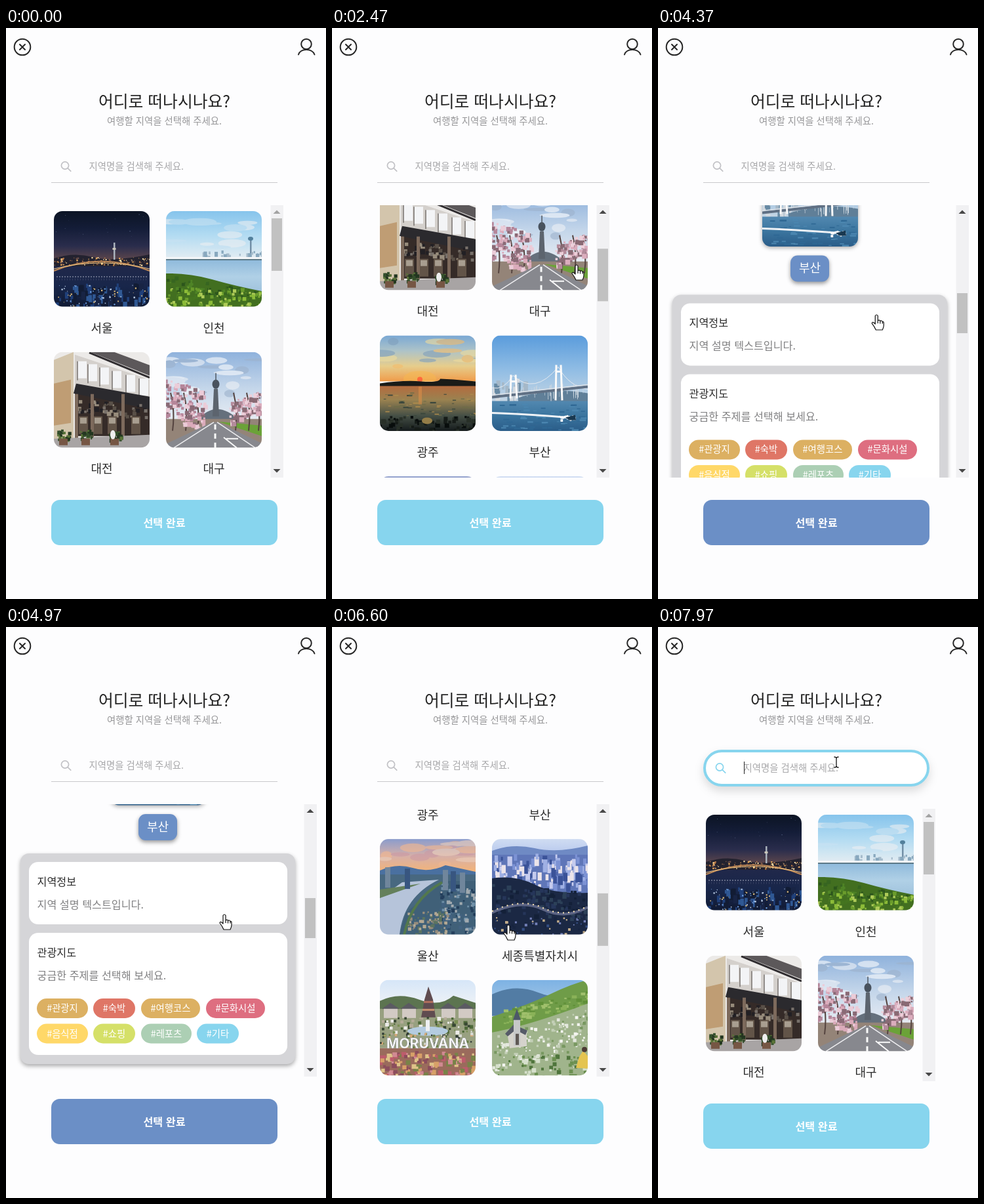
An HTML page that plays this animation: 488 px wide and 870 px high, repeating every 8 s.

```html
<!DOCTYPE html>
<html lang="ko">
<head>
<meta charset="utf-8">
<title>지역 선택</title>
<style>
html, body { margin: 0; width: 100%; height: 100%; overflow: hidden; background: #fdfdfe; }
svg { display: block; width: 488px; height: 870px; }
text { font: 400 14.4px "Noto Sans CJK KR", "Noto Sans CJK", sans-serif; fill: #2b2b2b; white-space: pre; }
.mid { text-anchor: middle; }
.name { font-size: 18px; }
.info { font-size: 16.2px; }
.tag { fill: #fff; font-weight: 500; }
.line { fill: none; stroke: #262626; stroke-width: 2; stroke-linecap: round; }
.pointer { fill: #fff; stroke: #111; stroke-width: 1.2; stroke-linejoin: round; }
.photo { filter: blur(.6px); }
</style>
</head>
<body>
<svg viewBox="0 0 488 870">
  <defs>
    <clipPath id="view"><rect y="270" width="488" height="415"/></clipPath>
    <clipPath id="frame"><rect width="146" height="145.5" rx="13"/></clipPath>
  </defs>
  <rect width="488" height="870" fill="#fdfdfe"/>
  <g class="line">
    <circle cx="25" cy="29" r="12.3"/>
    <path d="M21 25l8 8M29 25l-8 8"/>
    <circle cx="458" cy="24.5" r="7.8"/>
    <path d="M446 40.5C449 30.5 467 30.5 470.5 40.5"/>
  </g>
  <text class="mid" x="241.5" y="121" style="font-size:24.8px;font-weight:500;fill:#222">어디로 떠나시나요?</text>
  <text class="mid" x="241.5" y="146.7" style="fill:#969698">여행할 지역을 선택해 주세요.</text>

  <path id="underline" d="M69 235.5H414" stroke="#c9c9cc"/>
  <rect id="box" x="71" y="189" width="341" height="52" rx="26" fill="#fff" stroke="#87d5ee" stroke-width="4"
        style="filter:drop-shadow(0 7px 7px #0002)"/>
  <g id="query">
    <g id="lens" fill="none" stroke-width="1.7" stroke-linecap="round">
      <circle cx="90" cy="209.5" r="5.6"/><path d="M94.2 213.7l4.5 4.5"/>
    </g>
    <text x="126.5" y="215.8" style="fill:#a8a8aa">지역명을 검색해 주세요.</text>
    <path id="caret" d="M127.5 201v19" stroke="#222"/>
  </g>

  <g id="lower">
    <g clip-path="url(#view)"><g id="list"></g></g>
    <g id="bar">
      <rect x="403.5" y="270" width="19.5" height="415" fill="#f1f1f3"/>
      <rect id="thumb" x="405" width="16" fill="#c1c1c1"/>
      <path id="up" d="M407.5 283l5.5-5.5 5.5 5.5z"/>
      <path d="M407.5 672l5.5 5.5 5.5-5.5z" fill="#484848"/>
    </g>
    <rect id="button" x="69" y="719" width="345" height="69" rx="13"/>
    <text class="mid" x="241.5" y="759.5" style="font-size:16.2px;font-weight:700;fill:#fff">선택 완료</text>
  </g>

  <g id="cursor">
    <path id="hand" class="pointer" d="M-2 1.5Q0-1.5 2 1.5V9Q4.5 7 5.5 9.5Q8 8 9 10.5Q11 10 11 12.5V16Q11 19 9 23H-1Q-3 18-7 13Q-7 10.5-4 12L-2 14ZM2 9v4M5.5 9.5v4M9 10.5v3"/>
    <path id="arrow" class="pointer" d="M0 0V16L4 12.5 6.5 18.5 9 17.4 6.5 11.5H12Z"/>
    <path id="beam" d="M-3.5-8Q0-8 0-6V6Q0 8-3.5 8M3.5-8Q0-8 0-6M0 6Q0 8 3.5 8" fill="none" stroke="#111" stroke-width="1.3"/>
  </g>
</svg>
<script>
const $ = id => document.getElementById(id);

// Small drawing kit for the 146 px pictures
let seed = 1, gradients = 0;
const random = () => (seed = seed * 16807 % 2147483647) / 2147483647;
const rect = (x, y, w, h, fill) => `<rect x="${x}" y="${y}" width="${w}" height="${h}" fill="${fill}"/>`;
const shape = (d, fill) => `<path d="${d}" fill="${fill}"/>`;
const stroke = (d, color, width = 1, extra = '') =>
  `<path d="${d}" fill="none" stroke="${color}" stroke-width="${width}" ${extra}/>`;
const oval = (x, y, rx, ry, fill) => `<ellipse cx="${x}" cy="${y}" rx="${rx}" ry="${ry}" fill="${fill}"/>`;
const fade = (y, h, ...colors) => {
  const id = 'fade' + gradients++;
  const stops = colors.map((c, i) => `<stop offset="${i / (colors.length - 1)}" stop-color="${c}"/>`).join('');
  return `<linearGradient id="${id}" x2="0" y2="1">${stops}</linearGradient>` + rect(0, y, 146, h, `url(#${id})`);
};
// Scattered specks; slope lowers the band towards its right end
const specks = (n, x, y, w, h, size, colors, slope = 0, tall = 1) => {
  let out = '';
  for (let i = 0; i < n; i++) {
    const u = random(), s = size * (.5 + random());
    out += rect((x + u * w).toFixed(1), (y + random() * h + u * slope).toFixed(1), s.toFixed(1),
      (s * tall).toFixed(1), colors[i % colors.length]);
  }
  return out;
};
const clouds = (n, y, h, colors) => {
  let out = '';
  for (let i = 0; i < n; i++)
    out += oval(random() * 146, y + random() * h, 8 + random() * 18, 2 + random() * 5, colors[i % colors.length]);
  return `<g opacity=".6">${out}</g>`;
};

const pictures = {
  서울: () => fade(0, 80, '#0c1424', '#141d38', '#2a2d4c', '#6a4d4c')
    + specks(14, 0, 4, 146, 40, .8, ['#5f6f92'])
    + shape('M0 72Q30 62 60 70T146 66V90H0Z', '#23222f')
    + rect(91, 48, 2.5, 26, '#a9b2bc') + rect(89.5, 56, 5, 3, '#c8c4b8')
    + specks(130, 0, 70, 146, 12, 1.6, ['#f2b15c', '#b87a48', '#ffe2a8', '#6c4f4a'])
    + fade(84, 62, '#20284a', '#18264a', '#101a34')
    + stroke('M0 91Q72 62 146 91', '#c08a58', 2) + stroke('M0 88Q72 70 146 88', '#f4c884', 1)
    + stroke('M4 100H142', '#a8adc0', 1, 'stroke-dasharray="2 2"')
    + stroke('M4 104H142', '#343e60', 3, 'stroke-dasharray="1 3"')
    + specks(90, 0, 110, 146, 34, 4.5, ['#20407a', '#121c34', '#2f5894', '#182444'], 0, 2)
    + specks(75, 0, 112, 146, 32, 1.6, ['#6f9fe0', '#c3d6ee', '#d3b478']),
  인천: () => fade(0, 76, '#86c4ec', '#b4dcf2', '#e8eef2')
    + clouds(12, 14, 45, ['#eceff2', '#c8e2f2'])
    + rect(128, 44, 2.5, 28, '#728fa6') + oval(129, 42, 4, 3, '#52809c')
    + specks(22, 55, 60, 90, 9, 4, ['#a6bccc', '#88a8be'], 0, 1.5)
    + rect(0, 70, 146, 3, '#f4f6f8') + rect(0, 73, 146, 2, '#5d7a88')
    + fade(75, 50, '#90bbdc', '#b0d0e6', '#9fc2dc')
    + shape('M0 95Q35 94 70 104T146 122V146H0Z', '#426f20')
    + specks(90, 0, 97, 146, 18, 4, ['#2c551c', '#4f8426', '#376521'], 25)
    + specks(130, 0, 114, 146, 30, 4, ['#8cbc38', '#6a9c2c', '#447420', '#aecb58'], 4),
  대전: () => rect(0, 0, 146, 146, '#eceae8')
    + shape('M0 12L30 0V146H0Z', '#d3c5ac') + shape('M0 48L26 42V108L0 112Z', '#bf9d74')
    + shape('M32 4L146 42V82L32 60Z', '#d4d0cc')
    + [36, 52, 70, 89, 110, 130].map(x => shape(`M${x} ${x * .28 + 4}h14l0 26h-14z`, '#f3f4f6')
      + stroke(`M${x} ${x * .28 + 4}v29`, '#77726e', 1.5)).join('')
    + shape('M56 0H92L146 20V36Z', '#5c585a') + stroke('M54 1L146 39', '#302d30', 3)
    + shape('M32 60L146 83V128H32Z', '#352b28')
    + shape('M34 48L146 68V87L30 63Z', '#2b2a2e')
    + specks(50, 34, 70, 105, 22, 5, ['#978c7c', '#595048', '#77706a', '#222024'], 8)
    + [38, 60, 82, 118].map(x => rect(x, 98, 14, 27, '#625448') + rect(x + 2, 100, 10, 9, '#a89e90')).join('')
    + [32, 56, 103].map(x => rect(x, 64, 5, 70, '#7d6a5c')).join('')
    + shape('M0 132L146 126V146H0Z', '#a8a4a4')
    + [14, 48, 92].map(x => specks(28, x - 9, 117, 18, 16, 4, ['#344f2c', '#5a7438', '#233620'])
      + rect(x - 6, 132, 13, 10, '#765644')).join('')
    + oval(90, 126, 4, 7, '#eeeeee'),
  대구: () => fade(0, 110, '#8fb2dc', '#c4d6ea', '#eceff4')
    + clouds(22, 8, 62, ['#fbfcfd', '#eef1f6', '#9db2cc'])
    + shape('M48 104Q76 70 112 104Z', '#65707c')
    + shape('M73 56h6l2 42h-10z', '#5c646e') + oval(76, 49, 5.5, 7, '#48525e') + rect(75.3, 32, 1.5, 14, '#4f5862')
    + rect(0, 102, 146, 44, '#948478') + shape('M80 106L146 112V128Z', '#6ba238')
    + [10, 30, 48, 106, 126, 141].map(x => stroke(`M${x} 120Q${x + 4} 90 ${x - 3} 62`, '#54433f', 2)).join('')
    + specks(150, -5, 38, 62, 60, 5, ['#dbabbb', '#b5869a', '#ebccd8', '#8a6a76'], 20)
    + specks(110, 96, 76, 50, 32, 5, ['#dbadbd', '#b48b9b', '#edd0da', '#896a74'], -20)
    + shape('M70 107H80L146 139V146H0V140Z', '#87888e')
    + stroke('M73 107L12 146M78 107L136 146', '#eeeef0', 1.5)
    + stroke('M75 110V146', '#fafafa', 3, 'stroke-dasharray="8 6"')
    + stroke('M88 130l20 16M92 132h18', '#fafafa', 2),
  광주: () => fade(0, 70, '#7aa8d4', '#adc3c8', '#e6cd8c', '#f09c4a')
    + clouds(14, 5, 50, ['#f0dc9c', '#7f9fbc', '#f3bc6c'])
    + oval(61, 66, 25, 12, '#f7b85088') + oval(61, 67, 4, 4, '#ff6a3c')
    + fade(74, 72, '#b8683c', '#9a8250', '#465046', '#141a1c')
    + shape('M0 73Q35 68 63 70T92 66L112 67 146 70V77H0Z', '#1a1b18')
    + rect(59, 78, 5, 27, '#e8924880')
    + specks(55, 0, 86, 146, 36, 6, ['#ac8a4c', '#3a463c', '#6f6c48'], 0, .25)
    + specks(70, 0, 122, 146, 22, 5, ['#161c18', '#283028', '#080d0c']) + oval(72, 130, 8, 5, '#947d48'),
  부산: () => fade(0, 102, '#5a9cdc', '#8fbce4', '#c6d6e4')
    + specks(28, 0, 64, 48, 28, 5, ['#d4dae0', '#688aa4', '#a5b8c8'], 0, 3)
    + shape('M40 95Q90 78 146 88V104H40Z', '#607f98')
    + stroke('M32 61Q65 92 101 48Q118 78 146 82M0 80Q18 84 32 61', '#e5eaf0', 1)
    + specks(34, 42, 74, 100, 14, .8, ['#cdd7e0'], 0, 14)
    + stroke('M0 94L146 78', '#607084', 4) + stroke('M0 91L146 75', '#dde2e8', 1.5)
    + [[32, 60, 36], [101, 45, 54]].map(([x, y, h]) =>
      stroke(`M${x - 4} ${y + h}L${x - 3} ${y}M${x + 6} ${y + h}L${x + 4} ${y}M${x - 3} ${y + 10}h7`, '#fafafa', 3)).join('')
    + fade(100, 46, '#5288b0', '#3a749e', '#2a5c88')
    + specks(65, 0, 104, 146, 40, 7, ['#4b86b0', '#2f6894'], 0, .25)
    + stroke('M0 118Q60 120 128 126', '#eef2f6', 3) + specks(18, 98, 121, 28, 8, 3, ['#fcfdff'])
    + shape('M112 125l15-4 1 8h-10z', '#193850'),
  울산: () => fade(0, 52, '#8b9ccc', '#d6b0a8', '#f6b474')
    + clouds(18, 3, 36, ['#f3b890', '#cc9aa4', '#eccfbc'])
    + shape('M0 48Q25 36 50 44T100 40L146 50V65H0Z', '#4a70a0') + rect(0, 54, 146, 92, '#486880')
    + shape('M34 66L90 62Q36 88 30 146H0V90Z', '#b6c4da') + shape('M0 77L62 68 0 90Z', '#64805c')
    + shape('M98 64L40 112 30 146H146V64Z', '#406078')
    + specks(110, 90, 66, 56, 76, 4, ['#7090a8', '#a1aab0', '#243f5c', '#426280'])
    + specks(80, 42, 110, 60, 34, 3.5, ['#968c7c', '#5b7360', '#b3a894'])
    + [8, 38, 96, 108, 122].map((x, i) => rect(x, 43 + i * 2, 8, 31, i % 2 ? '#385680' : '#70869c')).join('')
    + stroke('M95 66Q48 92 37 146', '#53784d', 4),
  세종특별자치시: () => fade(0, 30, '#cfdcf2', '#b0c2ec') + shape('M0 18Q30 6 65 14T146 10V40H0Z', '#6f8ac4')
    + rect(0, 24, 146, 65, '#5f76b8')
    + specks(150, 0, 22, 146, 50, 5, ['#c5cbee', '#7c92d4', '#ebe4ea', '#3a5298', '#9fb0e4'], 0, 2)
    + shape('M0 60Q35 54 64 69T146 82V146H0Z', '#1b2844')
    + specks(100, 0, 68, 146, 42, 5, ['#26365a', '#132038', '#2c4058'], 12)
    + stroke('M0 112Q45 91 78 107T146 104', '#5c6484', 4)
    + stroke('M0 110Q45 89 78 105T146 102', '#ffe8b8', 2, 'stroke-dasharray="2 6"')
    + specks(55, 0, 118, 146, 27, 3, ['#c0aa88', '#344e84', '#7380b8', '#172440']),
  경기도: () => fade(0, 45, '#d6e6f8', '#f2f4f6') + shape('M0 32Q28 18 60 30T112 24L146 35V60H0Z', '#5c7450')
    + rect(0, 44, 146, 60, '#98a080') + [6, 34, 94, 120].map(x => rect(x, 43, 21, 15, '#d2cac4')
      + shape(`M${x - 3} 44l13-9 14 9z`, '#5b5a62')).join('')
    + shape('M74 10l7 20 4 27H63l5-27z', '#604c50') + rect(67, 32, 14, 3, '#b26f5c') + rect(65, 44, 18, 3, '#c99270')
    + specks(100, 0, 56, 146, 28, 4, ['#4d6938', '#ecebe8', '#7b8f54', '#394834', '#b4ac98'])
    + oval(73, 78, 31, 7, '#b4cce0') + rect(70, 61, 6, 17, '#eef0f2')
    + specks(65, 0, 80, 146, 24, 3, ['#d8dad4', '#677f44', '#303b36', '#d6a878'])
    + rect(0, 104, 146, 42, '#9a6b5c')
    + `<text x="73" y="104" text-anchor="middle" style="font:700 21px Inter,sans-serif;fill:#fdfdff;stroke:#8a8a94;stroke-width:.5px">MORUVANA</text>`
    + specks(150, -3, 108, 149, 38, 5.5, ['#bd5c6c', '#d7a068', '#8b4d5c', '#d18a92', '#788348', '#dfc388']),
  강원도: () => fade(0, 45, '#7db2e4', '#a9c8e4') + shape('M0 22Q35 5 70 19T146 17V55H0Z', '#527ca4')
    + shape('M0 56Q55 38 88 22T146 0V146H0Z', '#6f9c48')
    + specks(75, 15, 45, 130, 22, 6, ['#8ab258', '#609038', '#a0c06c'], -28, .6)
    + shape('M0 80Q55 70 146 36V146H0Z', '#a0b48c')
    + specks(150, 0, 86, 146, 56, 3.5, ['#e4e8de', '#c3cfb6', '#789860', '#f4f5f0'], -42)
    + specks(65, 0, 112, 146, 34, 4.5, ['#6b9050', '#d6e0cc', '#4f753c'])
    + shape('M23 80L37 69 53 78V101L27 104Z', '#d5d3cc') + shape('M20 82L33 68 54 77 51 84 36 76 24 86Z', '#565b68')
    + rect(33, 60, 10, 40, '#c6c8c8') + shape('M32 61L38 44 44 61Z', '#4c5868') + rect(36, 82, 5, 17, '#5e5854')
    + shape('M128 134L133 117 139 108 146 116V135Z', '#e4c450') + oval(141, 106, 4, 4, '#4c3a34')
};

const CHOSEN = '부산', ROW = 214.7, SKY = '#87d5ee', BLUE = '#6b8fc6';
const panel = () => {
  const card = (y, h) => `<rect x="35" y="${y}" width="394" height="${h}" rx="14" fill="#fff"/>`;
  const line = (y, str, fill = '#2b2b2b') => `<text class="info" x="47.5" y="${y}" style="fill:${fill}">${str}</text>`;
  const tags = [
    [47, 566, 78, '관광지', '#dcb062'], [133, 566, 64, '숙박', '#df7666'], [206, 566, 90, '여행코스', '#dcb062'],
    [305, 566, 90, '문화시설', '#de6e80'], [47, 604.5, 78, '음식점', '#ffd868'], [133, 604.5, 64, '쇼핑', '#d5e068'],
    [206, 604.5, 77, '레포츠', '#accfb4'], [291, 604.5, 64, '기타', SKY]
  ].map(([x, y, w, str, fill]) => `<rect x="${x}" y="${y}" width="${w}" height="30" rx="15" fill="${fill}"/>
    <text class="tag mid" x="${x + w / 2}" y="${y + 20}">#${str}</text>`).join('');
  return `<g id="panel">${rect(22, 929, 419, 4, '#d5d5d8')}
    <g transform="translate(0 837)">
      <rect x="202" y="285" width="59" height="40" rx="11" fill="${BLUE}" style="filter:drop-shadow(0 3px 3px #0006)"/>
      <text class="name mid" x="231.5" y="311" style="fill:#fff">${CHOSEN}</text>
      <rect x="22" y="345" width="419" height="321" rx="13" fill="#d5d5d8" style="filter:drop-shadow(0 3px 3px #0005)"/>
      ${card(358, 95)}${card(466, 186)}
      ${line(394, '지역정보')}${line(428.5, '지역 설명 텍스트입니다.', '#808082')}
      ${line(501.5, '관광지도')}${line(536.5, '궁금한 주제를 선택해 보세요.', '#808082')}${tags}
    </g></g>`;
};

const names = Object.keys(pictures);
$('list').innerHTML = names.map((name, i) => {
  seed = 977 * (i + 3);
  return `<g class="item"><g clip-path="url(#frame)"><g class="photo">${pictures[name]()}</g></g>
    <text class="name mid" x="73" y="184.5">${name}</text></g>`;
}).join('') + panel();
const items = [...document.querySelectorAll('.item')];

// Keys are [time, values...], eased between neighbours
const scrollKeys = [[0, 0], [1400, 0], [1700, 78], [1850, 78], [2350, 240], [2550, 240], [3150, 361], [3750, 361],
  [4550, 837], [5250, 837], [5850, 600], [6700, 600], [7350, 0]];
const cursorKeys = [[450, 425, 560], [950, 373, 376], [1700, 373, 374], [2400, 373, 361], [2600, 373, 361],
  [3150, 336, 427], [3800, 336, 427], [4500, 333, 438], [5400, 333, 438], [6000, 269, 454], [6900, 269, 454],
  [7500, 272, 206]];
const CLICK_ON = 3400, CLICK_OFF = 6200, FOCUS = 7650;

function sample(keys, t) {
  const next = keys.findIndex(k => k[0] > t);
  if (next <= 0) return keys[next ? keys.length - 1 : 0].slice(1);
  const a = keys[next - 1], b = keys[next];
  const u = (t - a[0]) / (b[0] - a[0]), e = u * u * (3 - 2 * u);
  return a.slice(1).map((v, i) => v + (b[i + 1] - v) * e);
}
const move = (el, x, y) => el.setAttribute('transform', `translate(${x} ${y})`);
const show = (el, on) => el.style.display = on ? '' : 'none';

function layout(open) {
  items.forEach((item, i) => {
    const picked = open && names[i] === CHOSEN;
    const row = i >> 1, x = (open ? [47, 270] : [73, 244])[i % 2];
    move(item, picked ? 159 : x, picked ? 963 : 279 + row * ROW + (open && row > 2 ? 640 : 0));
    item.style.filter = picked ? 'drop-shadow(0 2px 3px #0005)' : '';
    show(item.lastElementChild, !picked);
  });
  show($('panel'), open);
  move($('bar'), open ? 51 : 0, 0);
  $('thumb').setAttribute('height', open ? 61 : 80);
  $('button').setAttribute('fill', open ? BLUE : SKY);
}

function cursorKind(x, y, scroll, open) {
  if (y < 236) return 'beam';
  if (y < 270) return 'arrow';
  const top = y + scroll;
  if (open) return top > 963 ? 'hand' : 'arrow';
  return (top - 279) % ROW < 192 && x > 244 && x < 390 ? 'hand' : 'arrow';
}

let wasOpen;
function draw(t) {
  const open = t >= CLICK_ON && t < CLICK_OFF, focused = t >= FOCUS;
  const [scroll] = sample(scrollKeys, t), [x, y] = sample(cursorKeys, t);
  if (open !== wasOpen) layout(wasOpen = open);
  move($('list'), 0, -scroll);
  $('thumb').setAttribute('y', 290 + scroll * (open ? .147 : .193));
  $('up').setAttribute('fill', scroll < 1 ? '#a3a3a3' : '#484848');

  show($('box'), focused);
  show($('underline'), !focused);
  show($('caret'), focused);
  $('lens').setAttribute('stroke', focused ? SKY : '#c2c2c6');
  move($('query'), focused ? 4 : 0, focused ? 4 : 0);
  move($('lower'), 0, focused ? 7 : 0);

  show($('cursor'), t >= cursorKeys[0][0]);
  move($('cursor'), x, y);
  const kind = cursorKind(x, y, scroll, open);
  for (const id of ['hand', 'arrow', 'beam']) show($(id), id === kind);
}

let start;
function tick(now) {
  start ??= now;
  draw((now - start) % 8000);
  requestAnimationFrame(tick);
}
draw(0);
requestAnimationFrame(tick);
</script>
</body>
</html>
```
